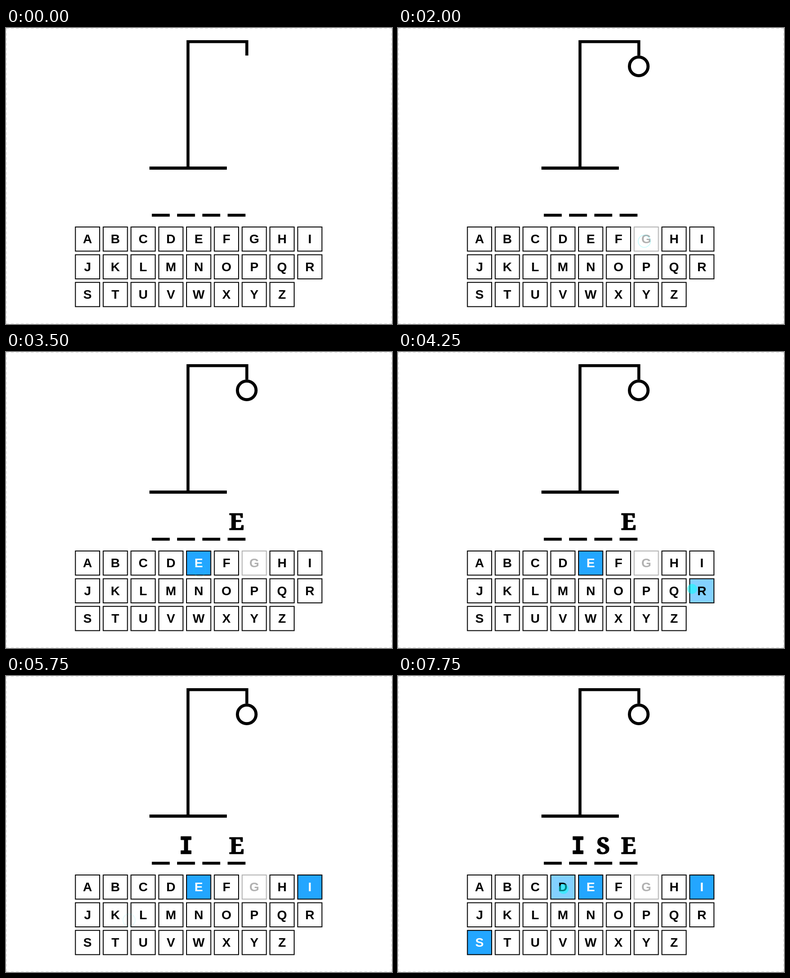
Animation, 853 px wide and 656 px high, one loop 8000 ms. Source, as an HTML page with a canvas:

```html
<!DOCTYPE html>
<html lang="en">
<head>
<meta charset="utf-8">
<title>Word guessing game</title>
<style>
  html, body { margin: 0; width: 100%; height: 100%; overflow: hidden; background: #fff; }
  canvas { display: block; }
</style>
</head>
<body>
<canvas id="stage" width="853" height="656"></canvas>
<script>
const ctx = document.getElementById('stage').getContext('2d');
const LOOP = 8000, TICK = 250;
const PITCH = 61.4, KEY = 55.6, LEFT = 152.4, TOP = 440;
const WORD = '?ISE';
const guessedAt = { G: 2000, E: 3250, I: 5000, S: 6750 };

// Pointer waypoints: time, x, y, optional opacity of an idle ring
const path = [
  [500, 572, 420], [1000, 524, 466], [1250, 496, 474, .32], [1500, 541, 474],
  [2250, 546, 472], [2750, 466, 474], [3250, 429, 483], [3500, 428, 484, .2],
  [4000, 596, 540], [4250, 650, 525], [4750, 654, 474], [5250, 656, 474],
  [5500, 440, 512], [5750, 272, 541, .1], [6000, 190, 582], [6500, 180, 590],
  [7000, 180, 590], [7750, 366, 472]
];

const keys = [...'ABCDEFGHIJKLMNOPQRSTUVWXYZ'].map((letter, i) => ({
  letter, x: LEFT + i % 9 * PITCH, y: TOP + Math.floor(i / 9) * PITCH
}));

function pointerAt(t) {
  const i = path.findLastIndex(p => p[0] <= t);
  if (i < 0) return null;
  const a = path[i], b = path[i + 1] || a;
  const k = b === a ? 0 : (t - a[0]) / (b[0] - a[0]);
  return {
    x: a[1] + (b[1] - a[1]) * k,
    y: a[2] + (b[2] - a[2]) * k,
    ring: t === a[0] ? a[3] : 0
  };
}

const isGuessed = (letter, t) => t >= guessedAt[letter];

function keyUnder(p, t) {
  if (!p || p.ring) return null;
  return keys.find(k => !isGuessed(k.letter, t) &&
    p.x >= k.x && p.x <= k.x + KEY && p.y >= k.y && p.y <= k.y + KEY);
}

function line(width, ...pts) {
  ctx.lineWidth = width;
  ctx.beginPath();
  for (let i = 0; i < pts.length; i += 2) ctx.lineTo(pts[i], pts[i + 1]);
  ctx.stroke();
}

function circle(x, y, r) {
  ctx.beginPath();
  ctx.arc(x, y, r, 0, Math.PI * 2);
}

function drawBorder() {
  ctx.strokeStyle = '#ccc';
  ctx.setLineDash([6, 5]);
  line(1, 0, .5, 853, .5);
  line(1, 0, 655.5, 853, 655.5);
  line(1, .5, 0, .5, 656);
  line(1, 852.5, 0, 852.5, 656);
  ctx.setLineDash([]);
}

function drawGallows(t) {
  ctx.strokeStyle = '#000';
  line(6.8, 317, 310.5, 488, 310.5);
  line(6.6, 402.2, 310, 402.2, 30.2, 532.2, 30.2, 532.2, 61);
  if (isGuessed('G', t)) {
    circle(532, 85, 20.6);
    ctx.lineWidth = 6.8;
    ctx.stroke();
  }
}

function drawWord(t) {
  ctx.fillStyle = ctx.strokeStyle = '#000';
  ctx.lineJoin = 'round';
  [...WORD].forEach((letter, i) => {
    const x = 322.3 + i * 55.8;
    ctx.fillRect(x, 411.7, 39.5, 6.4);
    if (!isGuessed(letter, t)) return;
    const face = letter === 'I' ? '"DejaVu Sans Mono", monospace' : '"Noto Serif", serif';
    ctx.font = 'bold 51px ' + face;
    ctx.lineWidth = 1.6;
    ctx.fillText(letter, x + 19.7, 394);
    ctx.strokeText(letter, x + 19.7, 394);
  });
  ctx.lineJoin = 'miter';
}

function drawKeys(t, hovered) {
  ctx.font = 'bold 28px "Liberation Sans", Arial, sans-serif';
  for (const key of keys) {
    const { letter, x, y } = key;
    const done = isGuessed(letter, t);
    const hit = done && WORD.includes(letter);
    const ink = done && !hit ? '#b2b2b2' : '#000';
    ctx.fillStyle = hit ? '#23a6ff' : key === hovered ? '#83d1ff' : '#fff';
    ctx.strokeStyle = ink;
    ctx.lineWidth = 2;
    ctx.beginPath();
    ctx.rect(x + 1, y + 1, KEY - 2, KEY - 2);
    ctx.fill();
    ctx.stroke();
    ctx.fillStyle = hit ? '#fff' : ink;
    ctx.fillText(letter, x + KEY / 2, y + 37.2);
  }
}

function drawPointer(p, hovered) {
  if (hovered) {
    circle(p.x, p.y, 11);
    ctx.fillStyle = 'rgba(0, 255, 255, .5)';
    ctx.fill();
  } else {
    circle(p.x, p.y, 13.5);
    ctx.strokeStyle = `rgba(0, 230, 240, ${p.ring || .2})`;
    ctx.lineWidth = 1.8;
    ctx.stroke();
  }
}

function draw(now) {
  const t = Math.floor(now % LOOP / TICK) * TICK;
  const pointer = pointerAt(t);
  const hovered = keyUnder(pointer, t);
  ctx.fillStyle = '#fff';
  ctx.fillRect(0, 0, 853, 656);
  ctx.textAlign = 'center';
  drawBorder();
  drawGallows(t);
  drawWord(t);
  drawKeys(t, hovered);
  if (pointer) drawPointer(pointer, hovered);
}

let start;
function frame(now) {
  start ??= now;
  draw(Math.max(0, now - start));
  requestAnimationFrame(frame);
}
requestAnimationFrame(frame);
</script>
</body>
</html>
```
